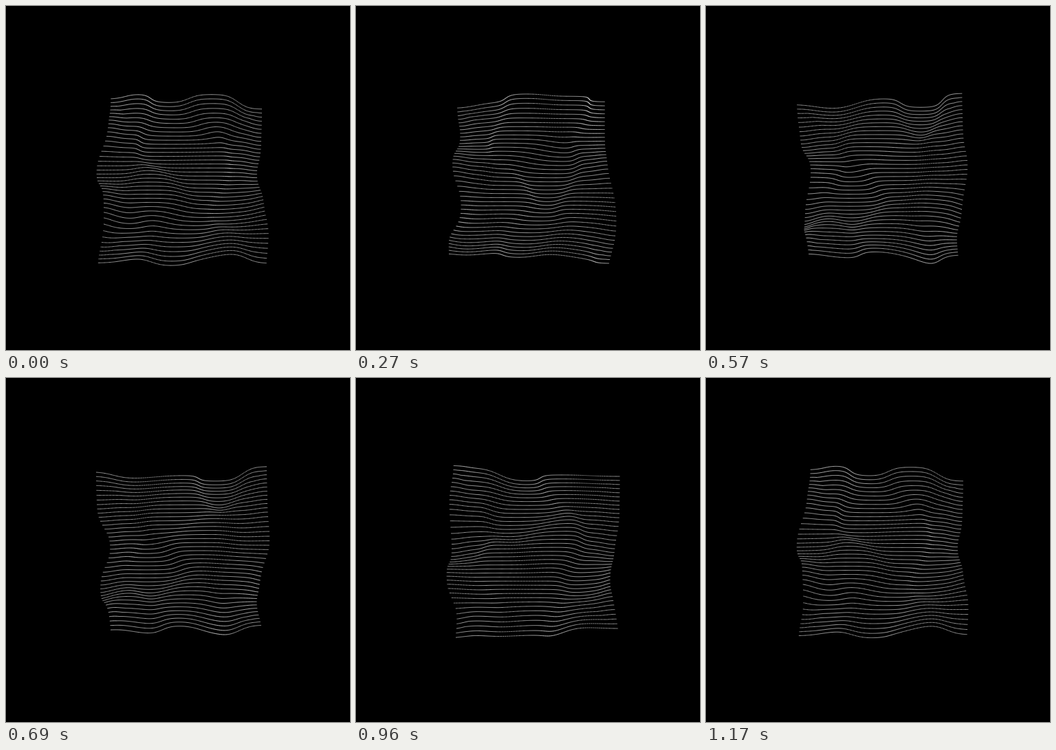
These frames come from a looping animation (500x500 px, 1.2 s). An HTML page with a canvas:

```html
<!DOCTYPE html>
<html lang="en">
<head>
<meta charset="utf-8">
<title>Rippling lines</title>
<style>
  html, body { margin: 0; width: 100%; height: 100%; overflow: hidden; background: #000; }
  canvas { display: block; }
</style>
</head>
<body>
<canvas id="stage" width="500" height="500"></canvas>
<script>
const ctx = document.getElementById('stage').getContext('2d');
const LOOP = 1200, STEP = 30;
const LINES = 40, DOTS = 220;
const BOX = { left: 142, top: 138, width: 230, height: 229 };
const INNER = 6, OUTER = 11.5, RIM = 9, REACH = 9;

// Key points of the cloth: x and y in percent of the box, and the angle
// in degrees at which that spot starts its small circular orbit.
const KEYS = [
  // top
  [0, 0, -14], [20, 0, -70], [42, 0, -190], [72, 0, -120], [100, 0, 95],
  // left
  [0, 22, -55], [0, 43, 175], [0, 68, -90], [0, 100, 150],
  // right
  [100, 25, 100], [100, 46, 148], [100, 66, -65], [100, 88, -20], [100, 100, 72],
  // bottom
  [20, 100, -165], [45, 100, 115], [65, 100, 162], [77, 100, -70],
  // inside
  [13, 89, 70], [50, 84, 55], [60, 45, 30], [45, 24, 140], [32, 64, -90], [88, 64, 120]
].map(([x, y, deg]) => {
  const a = deg * Math.PI / 180;
  return { x, y, cos: Math.cos(a), sin: Math.sin(a) };
});

// Orbit vector at a spot: the keys blended by nearness, wider at the rim
function orbit(x, y) {
  let sum = 0, cos = 0, sin = 0;
  for (const k of KEYS) {
    const w = Math.exp(-((x - k.x) ** 2 + (y - k.y) ** 2) / (2 * REACH * REACH));
    sum += w;
    cos += w * k.cos;
    sin += w * k.sin;
  }
  const rim = Math.min(x, y, 100 - x, 100 - y);
  const r = INNER + (OUTER - INNER) * Math.exp(-((rim / RIM) ** 2));
  return { cos: r * cos / sum, sin: r * sin / sum };
}

const dots = [];
for (let j = 0; j < LINES; j++) {
  const v = j / (LINES - 1);
  for (let i = 0; i < DOTS; i++) {
    const u = i / (DOTS - 1);
    dots.push({
      x: BOX.left + u * BOX.width,
      y: BOX.top + v * BOX.height,
      ...orbit(100 * u, 100 * v)
    });
  }
}

function draw(now) {
  const time = Math.floor((now % LOOP) / STEP) * STEP;
  const turn = time / LOOP * 2 * Math.PI;
  const c = Math.cos(turn), s = Math.sin(turn);
  ctx.fillStyle = '#000';
  ctx.fillRect(0, 0, 500, 500);
  ctx.fillStyle = 'rgba(255,255,255,0.6)';
  for (const d of dots) {
    ctx.fillRect(d.x + d.cos * c - d.sin * s, d.y + d.sin * c + d.cos * s, 1, 1);
  }
}

const start = performance.now();
function tick() {
  draw(performance.now() - start);
  requestAnimationFrame(tick);
}
tick();
</script>
</body>
</html>
```
